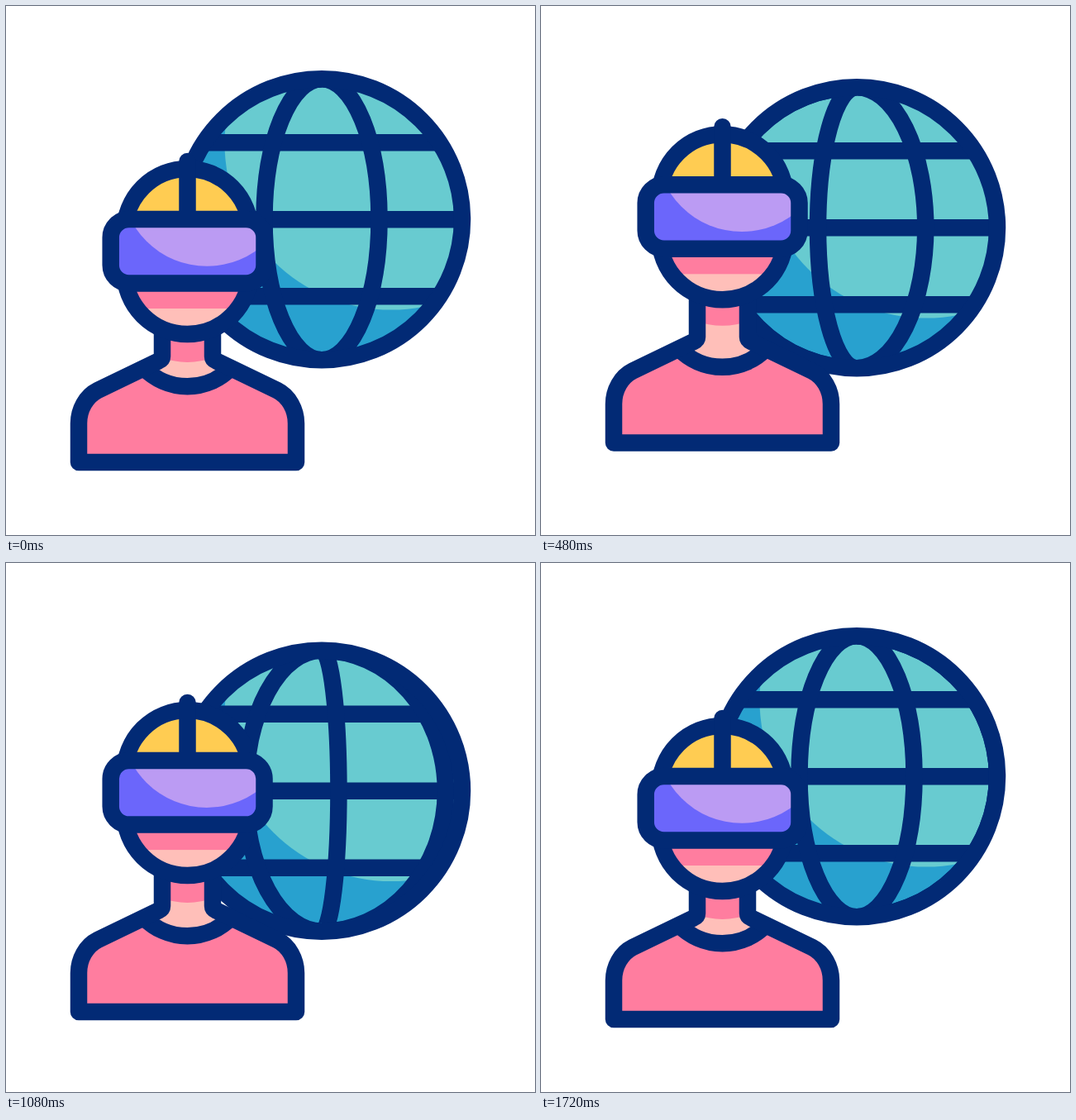
Recreate the animation shown at these times as an HTML page. Size 640x640 px, loop 2 s.

```html
<!DOCTYPE html>
<html lang="en">
<head>
<meta charset="utf-8">
<title>VR globe</title>
<style>
  html, body { margin: 0; width: 100%; height: 100%; overflow: hidden; background: #fff; }
  svg { display: block; width: 100%; height: 100%; }
  .line { fill: none; stroke: #022a75; stroke-width: 20.5; stroke-linejoin: round; }
</style>
</head>
<body>
<svg viewBox="0 0 640 640">
  <defs>
    <clipPath id="globeClip"><circle cx="382" cy="258.2" r="172"/></clipPath>
    <clipPath id="headClip"><rect x="143.5" y="197" width="152" height="200" rx="76"/></clipPath>
    <clipPath id="visorClip"><rect x="126.7" y="258" width="185.8" height="77.5" rx="22"/></clipPath>
    <clipPath id="neckClip"><rect x="189" y="300" width="61" height="160"/></clipPath>
  </defs>

  <g id="globe">
    <g clip-path="url(#globeClip)">
      <rect x="200" y="80" width="360" height="360" fill="#28a1cf"/>
      <circle cx="466" cy="166" r="201.5" fill="#68cbd0"/>
      <path class="line" d="M200 165.2H560M200 258.2H560M200 351.2H560"/>
      <path class="line meridian"/>
      <path class="line meridian"/>
      <path class="line meridian"/>
    </g>
    <circle class="line" cx="382" cy="258.2" r="170"/>
  </g>

  <g id="body">
    <path fill="#ffbfb9" d="M189 345V422L175 445A73 73 0 0 0 264 445L250 422V345Z"/>
    <g clip-path="url(#neckClip)">
      <rect id="neckShade" x="133.5" y="210" width="172" height="221" rx="86" fill="#ff7d9f"/>
    </g>
    <path fill="#ff7d9f" d="M88 552V505C88 488 97 472 111 465L167 438A73 73 0 0 0 272 438L328 465C342 472 351 488 351 505V552Z"/>
    <path class="line" d="M167 438A73 73 0 0 0 272 438"/>
    <path class="line" d="M189 345V424Q189 427.5 184.5 429.5L111 465C97 472 88 488 88 505V552H351V505C351 488 342 472 328 465L254.5 429.5Q250 427.5 250 424V345"/>
  </g>

  <g id="head">
    <g clip-path="url(#headClip)">
      <rect x="140" y="190" width="160" height="210" fill="#ffbfb9"/>
      <rect x="140" y="190" width="160" height="176" fill="#ff7d9f"/>
      <rect x="140" y="190" width="160" height="90" fill="#ffcc52"/>
    </g>
    <rect class="line" x="143.5" y="197" width="152" height="200" rx="76"/>
    <path class="line" stroke-linecap="round" d="M219.5 188V258"/>
    <g clip-path="url(#visorClip)">
      <rect x="126" y="258" width="187" height="78" fill="#6b66fb"/>
      <circle cx="243" cy="211.5" r="103.3" fill="#bb9bf3"/>
    </g>
    <rect class="line" x="126.7" y="258" width="185.8" height="77.5" rx="22"/>
  </g>
</svg>

<script>
const LOOP = 2000, MOVE_END = 1720, STEP = 40;
const byId = id => document.getElementById(id);
const globe = byId('globe'), body = byId('body'), head = byId('head'), neckShade = byId('neckShade');
const meridians = document.querySelectorAll('.meridian');

// Progress of the globe's turn: [ms, share of one meridian spacing]
const innerTurn = [[0, 0], [320, .018], [480, .162], [720, .63], [1080, .647], [1400, .993], [1560, 1], [1720, 1]];
const outerTurn = [[0, 0], [320, .018], [480, .137], [720, .57], [1080, .8], [1400, .99], [1560, 1], [1720, 1]];

const lerp = (a, b, u) => a + (b - a) * u;

function ease(t, start, end) {
  const u = Math.min(1, Math.max(0, (t - start) / (end - start)));
  return (1 - Math.cos(Math.PI * u)) / 2;
}

// Smooth curve through rising keys without overshoot
function follow(keys, t) {
  const slope = i => i < 0 || i > keys.length - 2 ? 0
    : (keys[i + 1][1] - keys[i][1]) / (keys[i + 1][0] - keys[i][0]);
  const tangent = i => {
    const a = slope(i - 1), b = slope(i);
    return a * b > 0 ? 2 * a * b / (a + b) : 0;
  };
  let i = 0;
  while (i < keys.length - 2 && t > keys[i + 1][0]) i++;
  const [t0, y0] = keys[i], [t1, y1] = keys[i + 1];
  const d = t1 - t0, u = (t - t0) / d, v = 1 - u;
  return y0 * v * v * (1 + 2 * u) + y1 * u * u * (3 - 2 * u)
    + d * u * v * (tangent(i) * v - tangent(i + 1) * u);
}

function shift(element, y) {
  element.setAttribute('transform', `translate(0 ${y})`);
}

function setMeridian(path, bulge) {
  path.setAttribute('d', `M382 88.2A${Math.abs(bulge)} 170 0 0 ${bulge > 0 ? 1 : 0} 382 428.2`);
}

function draw(t) {
  const bodyY = -29 * (ease(t, 67, 647) - ease(t, 718, 1298));
  const headY = -54.7 * (ease(t, 88, 668) - ease(t, 732, 1312));
  shift(globe, 20 * (ease(t, 120, 840) - ease(t, 925, 1600)));
  shift(body, bodyY);
  shift(head, headY);
  shift(neckShade, headY * 1.06 - bodyY);

  // The incoming meridian starts out of sight behind the globe's edge
  const inner = follow(innerTurn, t), outer = follow(outerTurn, t);
  setMeridian(meridians[0], lerp(-185, -69.5, outer));
  setMeridian(meridians[1], lerp(-69.5, 69.5, inner));
  setMeridian(meridians[2], lerp(69.5, 170, outer));
}

const startTime = performance.now();
function tick() {
  const t = (performance.now() - startTime) % LOOP;
  draw(Math.min(MOVE_END, Math.floor(t / STEP) * STEP));
  requestAnimationFrame(tick);
}
tick();
</script>
</body>
</html>
```
